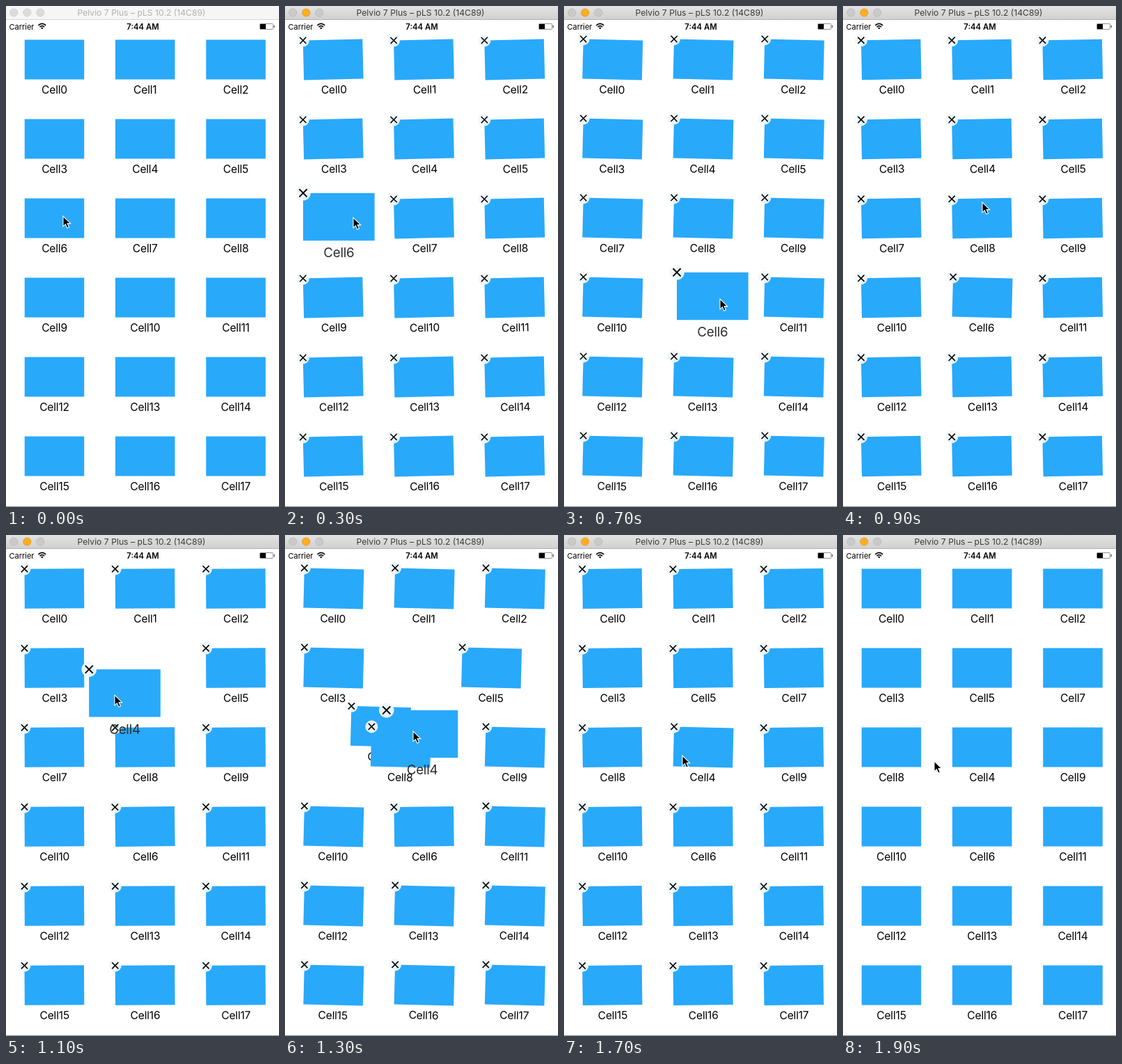
These frames come from a looping animation (392x720 px, 2000 ms). An HTML page:

```html
<!DOCTYPE html>
<html lang="en">
<head>
<meta charset="utf-8">
<title>Reorderable grid</title>
<style>
  html, body { margin: 0; width: 100%; height: 100%; overflow: hidden; background: #fff; }
  svg { display: block; width: 100%; height: 100%; }
  text { font-family: Inter, "Open Sans", sans-serif; text-anchor: middle; }
  .label { font-size: 15.6px; letter-spacing: -.2px; }
</style>
</head>
<body>
<svg id="stage" viewBox="0 0 392 720">
  <defs>
    <linearGradient id="chrome" x2="0" y2="1">
      <stop stop-color="#e4e3e4"/><stop offset="1" stop-color="#d1d0d1"/>
    </linearGradient>
  </defs>
  <rect width="392" height="720" fill="#fff"/>
  <rect id="bar" width="392" height="19.5"/>
  <rect id="edge" y="19" width="392" height="1"/>
  <g id="lights" stroke-width=".8">
    <circle cx="11.3" cy="9.5" r="5.6"/><circle cx="30.3" cy="9.5" r="5.6"/><circle cx="49.3" cy="9.5" r="5.6"/>
  </g>
  <text id="title" x="194.5" y="14" font-size="12.2">Pelvio 7 Plus – pLS 10.2 (14C89)</text>
  <text x="22.5" y="34" font-size="11">Carrier</text>
  <g fill="none" stroke="#000" stroke-width="1.7">
    <path d="M46.4 27.8Q51.8 22.8 57.2 27.8M48.5 30.1Q51.8 27.1 55.1 30.1"/>
    <path d="M50 31.5Q51.8 30 53.6 31.5L51.8 33.5Z" fill="#000" stroke="none"/>
  </g>
  <text x="196.5" y="34" font-size="11.3" font-weight="600">7:44 AM</text>
  <rect x="364.5" y="25.5" width="19" height="8" rx="1" fill="#fff" stroke="#777" stroke-width=".8"/>
  <rect x="365" y="26" width="8" height="7"/>
  <rect x="384.6" y="28" width="1.3" height="3" fill="#555"/>
  <g id="grid"></g>
  <path id="cursor" d="M0 0V14.8L3.4 11.6L5.8 17.1L8.5 16L6.1 10.6H10.7Z" stroke="#fff" stroke-width="1.1"/>
  <rect y="719" width="392" height="1" fill="#7b9696"/>
</svg>
<script>
const $ = id => document.getElementById(id);
const LOOP = 2000, STEP = 100, EDIT_ON = 200, EDIT_OFF = 1900;
const BLUE = '#29a9fa';

// Each move takes one cell out of the order and inserts it at a new slot.
const moves = [
  { at: 350, id: 6, to: 7 },
  { at: 550, id: 6, to: 10 },
  { at: 1250, id: 4, to: 7 }
];
const MOVE_TIME = 150;

// Keyframes: time, x, y, scale
const drags = {
  6: [[200, 69.5, 304.5, 1.2], [300, 77.3, 303, 1.2], [400, 140, 309, 1.2],
      [500, 210.3, 317.3, 1.2], [700, 213.3, 417, 1.2], [850, 199.7, 419, 1]],
  4: [[1000, 199.7, 191, 1.2], [1100, 170.5, 227.3, 1.2], [1300, 197, 286, 1.2],
      [1500, 209.5, 312, 1.2], [1650, 199.7, 305, 1]]
};
const pointer = [[0, 82, 302], [200, 82, 302], [300, 98, 304], [400, 156, 308], [500, 223, 313],
  [700, 224, 421], [800, 215, 370], [1000, 185, 194], [1100, 156, 230], [1300, 184, 282],
  [1500, 196, 310], [1600, 195, 311], [1800, 145, 323], [1900, 131, 325]];

const phase = { 6: 227, 4: 100 };

const mix = (a, b, k) => a + (b - a) * k;
const clamp = k => Math.min(1, Math.max(0, k));
const ease = k => k * k * (3 - 2 * k);

function sample(keys, t) {
  const i = keys.findIndex(k => k[0] > t);
  if (i < 0) return keys[keys.length - 1].slice(1);
  if (i === 0) return keys[0].slice(1);
  const [a, b] = [keys[i - 1], keys[i]];
  const k = (t - a[0]) / (b[0] - a[0]);
  return a.slice(1).map((v, j) => mix(v, b[j + 1], k));
}

const slotPos = s => [69.5 + 130.25 * (s % 3), 77 + 114 * Math.floor(s / 3)];

const orders = [[...Array(18).keys()]];
for (const m of moves) {
  const next = orders[orders.length - 1].filter(id => id !== m.id);
  next.splice(m.to, 0, m.id);
  orders.push(next);
}

function restPos(id, t) {
  let pos = slotPos(id);
  moves.forEach((m, i) => {
    const k = ease(clamp((t - m.at) / MOVE_TIME));
    const goal = slotPos(orders[i + 1].indexOf(id));
    pos = pos.map((v, j) => mix(v, goal[j], k));
  });
  return pos;
}

// Draggable cells come last so that they lie on top.
const cells = orders[0].slice().sort((a, b) => (a in drags) - (b in drags)).map(id => {
  const node = document.createElementNS('http://www.w3.org/2000/svg', 'g');
  node.innerHTML = `<rect x="-42.75" y="-28.5" width="85.5" height="57" fill="${BLUE}"/>
    <text class="label" y="48.7">Cell${id}</text>
    <g class="badge" transform="translate(-42.7 -28.5)">
      <circle r="9" fill="#f1f7f9" fill-opacity=".94"/>
      <path d="M-4.6 -4.6L4.6 4.6M4.6 -4.6L-4.6 4.6" stroke="#000" stroke-width="1.6"/>
    </g>`;
  $('grid').append(node);
  return { id, node, label: node.querySelector('text'), badge: node.querySelector('.badge') };
});

function drawWindow(active) {
  $('bar').setAttribute('fill', active ? 'url(#chrome)' : '#f6f6f6');
  $('edge').setAttribute('fill', active ? '#b3b2b3' : '#d6d6d6');
  $('title').setAttribute('fill', active ? '#3c3c3c' : '#b2b2b2');
  [...$('lights').children].forEach((c, i) => {
    const lit = active && i === 1;
    c.setAttribute('fill', lit ? '#fdae1f' : active ? '#cbcacb' : '#dcdcdc');
    c.setAttribute('stroke', lit ? '#e09a22' : active ? '#b8b7b8' : '#cfcfcf');
  });
}

function drawCell({ id, node, label, badge }, t) {
  const editing = t >= EDIT_ON && t < EDIT_OFF;
  const keys = drags[id];
  const held = keys && t >= keys[0][0] && t < keys[keys.length - 1][0];
  const [x, y, scale = 1] = held ? sample(keys, t) : restPos(id, t);
  const dropped = keys && t >= keys[0][0];
  const turn = (t / STEP - 5) * 57.5 + (dropped ? phase[id] : 0);
  const tilt = editing && !held ? 1.5 * Math.sin(turn * Math.PI / 180) : 0;
  node.setAttribute('transform', `translate(${x} ${y}) scale(${scale}) rotate(${tilt} 0 13)`);
  label.setAttribute('fill', held ? '#2c2c2c' : '#000');
  badge.setAttribute('visibility', editing ? 'visible' : 'hidden');
}

function draw(t) {
  drawWindow(t >= STEP);
  cells.forEach(c => drawCell(c, t));
  $('cursor').setAttribute('transform', `translate(${sample(pointer, t).join(' ')})`);
}

const start = performance.now();
function tick() {
  const t = (performance.now() - start) % LOOP;
  draw(Math.floor(t / STEP) * STEP);
  requestAnimationFrame(tick);
}
tick();
</script>
</body>
</html>
```
